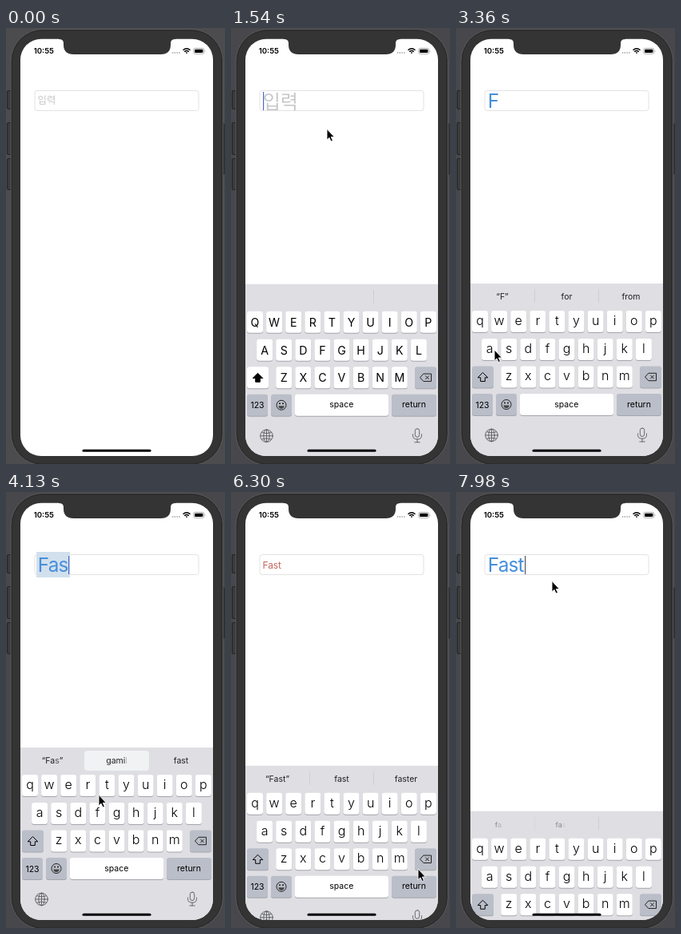
These frames come from a looping animation (274 by 546 pixels, 8000 ms). An HTML page:

```html
<!DOCTYPE html>
<html lang="ko">
<head>
<meta charset="utf-8">
<title>Text field focus</title>
<style>
html, body { margin: 0; width: 100%; height: 100%; overflow: hidden; background: #48484c; }
svg { display: block; width: 274px; height: 546px; font-family: Inter, "Liberation Sans", sans-serif; }
.ko { font-family: "Noto Sans CJK KR", "Noto Sans CJK", "Noto Sans CJK JP", sans-serif; font-weight: 300; fill: #c8c8cb; }
.mid { text-anchor: middle; }
.line { fill: none; stroke: #5a5b60; stroke-width: .9; stroke-linecap: round; stroke-linejoin: round; }
</style>
</head>
<body>
<svg id="stage" viewBox="0 0 274 546">
  <defs>
    <clipPath id="screen"><rect x="18" y="13.700" width="241" height="522.300" rx="26"/></clipPath>
  </defs>
  <rect id="back" width="274" height="546"/>
  <g fill="#3b3b3d" stroke="#232325">
    <rect x="1.5" y="78.5" width="8" height="23" rx="1.5"/>
    <rect x="1.5" y="118.5" width="8" height="40" rx="1.5"/>
    <rect x="1.5" y="163.5" width="8" height="39" rx="1.5"/>
    <rect x="265" y="119.5" width="8" height="64" rx="1.5"/>
  </g>
  <rect x="6" y="1.5" width="265.5" height="546" rx="40" fill="#343435" stroke="#59595c"/>
  <rect x="7.5" y="3" width="262.5" height="543" rx="38" fill="#343435" stroke="#29292a"/>
  <g clip-path="url(#screen)">
    <rect x="18" y="13" width="241" height="523" fill="#fff"/>
    <rect x="36" y="78.5" width="205" height="25" rx="3" fill="#fff" stroke="#dfdfe1" stroke-width=".9"/>
    <rect id="mark" x="38" y="75" width="42" height="32" fill="#d2e0ed"/>
    <g id="field"></g>
    <rect id="caret" y="80" width="1.2" height="23"/>
    <g id="board"></g>
    <rect x="95.5" y="527.700" width="86" height="3" rx="1.5" fill="#000"/>
  </g>
  <path d="M66 13H212V14Q206 14 206 19V21Q206 33 193.500 33H84.500Q72 33 72 21V19Q72 14 66 14Z" fill="#343435"/>
  <text x="34.700" y="32.200" font-size="9.600" font-weight="600">10:55</text>
  <g fill="#b0b0b2">
    <circle cx="208.500" cy="31" r=".9"/><circle cx="211.300" cy="31" r=".9"/>
    <circle cx="214.100" cy="31" r=".9"/><circle cx="216.900" cy="31" r=".9"/>
  </g>
  <g fill="none" stroke="#000" stroke-width="1.5">
    <path d="M221.500 27.800Q226 23.800 230.500 27.800M223.200 29.700Q226 27.300 228.800 29.700"/>
    <path d="M224.700 30.700Q226 29.800 227.300 30.700L226 32.200Z" fill="#000" stroke="none"/>
  </g>
  <rect x="234.700" y="25.400" width="13" height="7" rx="2" fill="none" stroke="#9a9a9c" stroke-width=".8"/>
  <rect x="236" y="26.700" width="10.400" height="4.400" rx="1"/>
  <path d="M248.800 27.700Q250.200 29 248.800 30.200Z" fill="#8a8a8c"/>
  <path id="pointer" d="M0 0V13.600L3 10.900 5.100 15.600 7.400 14.600 5.300 10H9.400Z" fill="#000" stroke="#fff" stroke-width=".9"/>
</svg>
<script>
const LOOP = 8000, STEP = 70, BOARD_H = 216, PITCH = 24.1;
const $ = id => document.getElementById(id);
const rows = ["qwertyuiop", "asdfghjkl", "zxcvbnm"];
const rowX = [30, 42.1, 66.2], rowY = [354, 389, 423.5];
const GREY = "#babec8", BLUE = "#468fdb", RED = "#c2645d";

// Moments of the scene
const FOCUS = 1112, TYPE_F = 2660, TYPE_A = 3500, TYPE_S = 3850, TYPE_T = 4550,
      PRESS = 6160, DONE = 6270, REFOCUS = 7863;

const path = [
  [70, 249, 513], [700, 118, 96], [1100, 118, 96], [1260, 120, 126.5], [1890, 120, 126.5],
  [2450, 116, 402.5], [2870, 116, 402.5], [3430, 45, 403], [3640, 45, 403], [3780, 67, 403],
  [3920, 67, 403], [4130, 116, 379.3], [4480, 122, 377], [4830, 122, 377], [5320, 150, 412.5],
  [5600, 225, 472], [5740, 234, 472], [6650, 234, 472], [6930, 189, 320], [7420, 117, 96],
  [7630, 117, 96], [7910, 120, 111.5], [8000, 120, 111.5]
];

const taps = [["F", TYPE_F], ["a", TYPE_A], ["s", TYPE_S], ["t", TYPE_T]];

const text = (x, y, size, s, more = "") => `<text x="${x}" y="${y}" font-size="${size}" ${more}>${s}</text>`;
const mid = (x, y, size, s, more = "") => text(x, y, size, s, `class="mid" ${more}`);
const part = (s, o) => `<tspan fill-opacity="${o}">${s}</tspan>`;

function key(x, y, w, fill) {
  return `<rect x="${x}" y="${y + .9}" width="${w}" height="27" rx="3.2" fill="#a3a5ab"/>
    <rect x="${x}" y="${y}" width="${w}" height="27" rx="3.2" fill="${fill}"/>`;
}

function letters(upper) {
  return rows.map((row, r) => [...row].map((c, i) => {
    const x = rowX[r] + i * PITCH, y = rowY[r];
    return key(x - 10, y, 20, "#fff") + (upper
      ? mid(x, y + 19, 14.2, c.toUpperCase())
      : mid(x, y + 17.8, 16, c, 'font-weight="300"'));
  }).join("")).join("");
}

function popup(c) {
  const r = rows.findIndex(s => s.includes(c.toLowerCase()));
  const x = rowX[r] + rows[r].indexOf(c.toLowerCase()) * PITCH, y = rowY[r];
  return `<path d="M${x - 10} ${y + 24}q0 3 3 3h14q3 0 3 -3v-20q0 -5 5 -9q4 -3 4 -7v-21q0 -6 -6 -6h-26q-6 0 -6 6v21q0 4 4 7q5 4 5 9z"
    fill="#fff" stroke="#c3c5ca" stroke-width=".7"/>` + mid(x, y - 9, 24, c, 'font-weight="300"');
}

function controls(upper, pressed) {
  const arrow = "M33.500 431.500L27.200 437.800H30.700V442.500H36.300V437.800H39.800Z";
  return key(20, 423.5, 27, upper ? "#fff" : GREY) +
    `<path d="${arrow}" fill="${upper ? "#000" : "none"}" stroke="#000" stroke-linejoin="round"/>` +
    key(230, 423.5, 27, GREY) +
    `<path d="M236.500 437L240.800 432.300H250.500V441.700H240.800ZM243.300 434.800L247.700 439.200M247.700 434.800L243.300 439.200" fill="none" stroke="#222" stroke-linejoin="round"/>` +
    key(20, 458, 26, GREY) + mid(33, 475.5, 10.5, "123") +
    key(50, 458, 26, GREY) +
    `<circle cx="63" cy="471.500" r="6" fill="none" stroke="#222"/>
     <path d="M59.200 472.500H66.800Q66 476 63 476T59.200 472.500Z" fill="#444"/>
     <circle cx="61" cy="469.500" r=".9"/><circle cx="65" cy="469.500" r=".9"/>` +
    key(80, 458, 117, "#fff") + mid(138.3, 474.5, 10.5, "space") +
    key(201, 458, 56, pressed ? "#fff" : GREY) + mid(229, 474.5, 10.5, "return") +
    `<g class="line"><circle cx="44.500" cy="510" r="7.800"/><ellipse cx="44.500" cy="510" rx="3.700" ry="7.800"/>
      <path d="M36.700 510H52.300M44.500 502.200V517.800M38.500 505.800Q44.500 508.200 50.500 505.800M38.500 514.200Q44.500 511.800 50.500 514.200"/>
      <rect x="230.300" y="501" width="5.400" height="10.500" rx="2.700"/>
      <path d="M227.500 508V509.500Q227.500 514.300 233 514.300T238.500 509.500V508M233 514.300V518M229.800 518H236.200"/></g>`;
}

function hints(t) {
  if (t < TYPE_F) return [];
  if (t < TYPE_A) return ["“F”", "for", "from"];
  if (t < TYPE_S + 140) return ["“Fa”", "fa", "far"];
  if (t < TYPE_T) return t < 4200
    ? ["“Fa" + part("s", .75) + "”", "gami" + part("l", .3), "fast"]
    : ["“Fas”", "gamil", "fast"];
  if (t < REFOCUS) return ["“Fast”", "fast", t < 4830 ? "fast" : "faster"];
  return ["f" + part("a", .5), "fa" + part("s", .2), ""];
}

function bar(t) {
  const words = hints(t), fresh = t >= REFOCUS;
  const divider = (x, o) => `<path d="M${x}.500 327V344" stroke="#c9cacf" stroke-width=".8" opacity="${o}"/>`;
  let out = "";
  if (isMarked(t)) out += `<rect x="98" y="324" width="81" height="25" rx="4" fill="#f1f2f4"/>`;
  else out += divider(178, 1) + (words.length ? divider(98, fresh ? .5 : 1) : "");
  words.forEach((w, i) => {
    out += fresh ? mid([53, 131][i] || 219, 340, 9, w, 'fill="#85868b"')
                 : mid([58, 138.5, 219][i], 340.3, 10.5, w, 'fill="#222"');
  });
  return out;
}

const isMarked = t => t >= TYPE_S + 140 && t < TYPE_T;
// Critically damped spring: share of the way still to go
const rest = ms => ms <= 0 ? 1 : (1 + .0183 * ms) * Math.exp(-.0183 * ms);

function drop(t) {
  if (t < DONE) return BOARD_H * rest(t - FOCUS);
  if (t < REFOCUS) return BOARD_H * (1 - rest(t - DONE));
  return BOARD_H * rest(t - REFOCUS);
}

function drawField(t) {
  const active = (t >= FOCUS && t < DONE) || t >= REFOCUS;
  const typed = "Fast".slice(0, taps.filter(p => t >= p[1]).length);
  $("field").innerHTML = !typed
    ? (active ? text(39.7, 100.5, 24, "입력", 'class="ko"') : text(39.5, 95.3, 12.4, "입력", 'class="ko"'))
    : active
      ? text(39.7, 100.2, 24.3, typed, `fill="${BLUE}" letter-spacing="-.8"`)
      : text(39.5, 95.7, 12, typed, `fill="${RED}" letter-spacing="-.15"`);
  const since = t - [FOCUS, TYPE_F, TYPE_A, TYPE_S, TYPE_T, REFOCUS].filter(m => m <= t).pop();
  $("caret").setAttribute("visibility", active && since % 1100 < 560 ? "visible" : "hidden");
  $("caret").setAttribute("x", [40, 53.5, 66, 78, 86][typed.length]);
  $("caret").setAttribute("fill", t >= REFOCUS ? "#55555c" : "#4a68c8");
  $("mark").setAttribute("visibility", isMarked(t) ? "visible" : "hidden");
}

function drawBoard(t) {
  const off = drop(t), upper = t < TYPE_F + 100;
  const tap = taps.find(p => t >= p[1] && t < p[1] + 130);
  $("board").setAttribute("transform", `translate(0 ${off.toFixed(2)})`);
  $("board").innerHTML = off > BOARD_H - .5 ? "" :
    `<rect x="18" y="320" width="241" height="230" fill="#dedee3"/>` + bar(t) + letters(upper) +
    controls(upper, t >= PRESS && t < DONE) + (tap ? popup(tap[0]) : "");
}

function drawPointer(t) {
  const p = $("pointer");
  p.setAttribute("visibility", t < path[0][0] ? "hidden" : "visible");
  const i = path.findIndex(k => k[0] > t);
  if (i < 1) return;
  const [t0, x0, y0] = path[i - 1], [t1, x1, y1] = path[i];
  const u = (t - t0) / (t1 - t0), e = u * u * (3 - 2 * u);
  p.setAttribute("transform", `translate(${x0 + (x1 - x0) * e} ${y0 + (y1 - y0) * e})`);
}

function draw(t) {
  $("back").setAttribute("fill", t < 910 ? "#4c4c4e" : "#47474c");
  drawField(t);
  drawBoard(t);
  drawPointer(t);
}

const start = performance.now();
let last = -1;
function tick() {
  const t = Math.floor((performance.now() - start) % LOOP / STEP) * STEP;
  if (t !== last) draw(last = t);
  requestAnimationFrame(tick);
}
tick();
</script>
</body>
</html>
```
